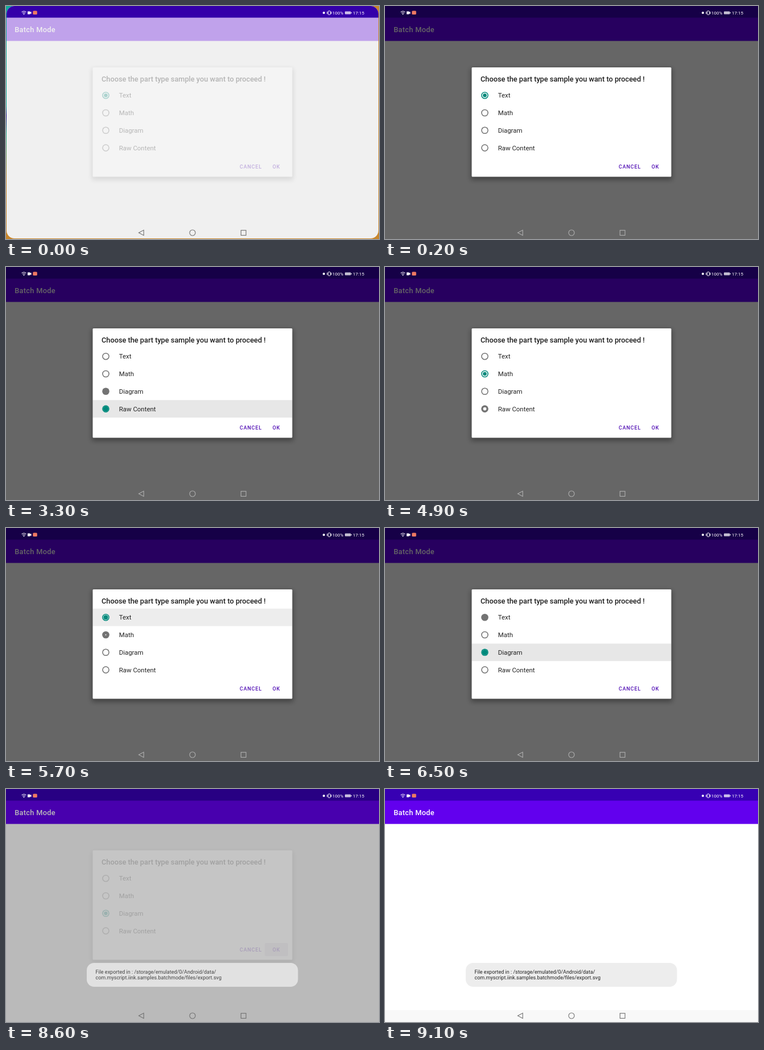
Write an HTML page that moves like this. It is 656 px wide and 410 px high and loops after 10000 ms.

```html
<!DOCTYPE html>
<html lang="en">
<head>
<meta charset="utf-8">
<title>Batch Mode</title>
<style>
  html, body { margin: 0; width: 100%; height: 100%; overflow: hidden; }
  body { background: linear-gradient(#1a9 0 43%, #218 47%, #2a8 55%, #c8862c 75%) 0 0 / 50% 100% no-repeat, #c8862c; }
  svg { display: block; width: 656px; height: 410px; font-family: Roboto, sans-serif; }
  .medium { font-weight: 500; }
  .button { font-size: 9px; letter-spacing: .85px; fill: #4f0cb4; }
</style>
</head>
<body>
<svg id="screen" viewBox="0 0 656 410">
  <defs>
    <filter id="blur" x="-10%" y="-10%" width="120%" height="125%"><feGaussianBlur stdDeviation="4"/></filter>
  </defs>

  <rect width="656" height="410" fill="#fff"/>
  <rect id="nav" y="389" width="656" height="21" fill="#f8f8f8"/>
  <rect id="header" y="20" width="656" height="41.5" fill="#6200ee"/>
  <rect width="656" height="20.5" fill="#3700b3"/>
  <text class="medium" x="15.2" y="45.6" font-size="12.8" letter-spacing=".3" fill="#fff">Batch Mode</text>
  <rect id="dim" width="656" height="410"/>

  <g fill="#fff" font-size="8">
    <g fill="none" stroke="#fff" stroke-width="1">
      <path d="M27.5 10.5q4-3 8 0M29 12.5q2.5-2 5 0"/>
      <rect x="566.5" y="8.8" width="4" height="6.4" rx=".8"/>
      <path d="M564.8 10v4M572.2 10v4"/>
    </g>
    <circle cx="31.5" cy="14.3" r="1"/>
    <path d="M38 9.5h4.5v1.5l2-1v4l-2-1v1.5h-4.5z"/>
    <rect x="47.3" y="8.5" width="7.5" height="6.5" rx="1.5" fill="#ee7a62"/>
    <circle cx="559" cy="12" r="2"/>
    <text x="574" y="15">100%</text>
    <rect x="596" y="9.5" width="10.5" height="5" rx="1" fill-opacity=".75"/>
    <rect x="606.8" y="11" width="1" height="2"/>
    <text x="610" y="15">17:15</text>
  </g>

  <g id="keys" fill="none" stroke-width="1.1">
    <path d="M233.5 399l8.7-4.7v9.4z"/>
    <circle cx="328" cy="399" r="5"/>
    <rect x="413.3" y="394.7" width="8.8" height="8.8"/>
  </g>

  <g id="dialog">
    <rect x="151" y="110" width="354" height="196" fill-opacity=".35" filter="url(#blur)"/>
    <rect x="152.5" y="108" width="351" height="192.5" rx="1.5" fill="#fff"/>
    <text class="medium" x="168" y="132.6" font-size="12.75" fill="#1d1d1d">Choose the part type sample you want to proceed !</text>
    <g id="rows"></g>
    <rect id="press" x="455" y="271" width="41" height="23" rx="2" fill="#30135c"/>
    <text class="medium button" x="411" y="286">CANCEL</text>
    <text class="medium button" x="468.7" y="286">OK</text>
  </g>

  <g id="toast">
    <rect x="142" y="306" width="371.5" height="42" rx="13" fill="#ededed"/>
    <g font-size="9" fill="#222">
      <text x="157.5" y="325">File exported in : /storage/emulated/0/Android/data/</text>
      <text x="157.5" y="335.4">com.myscript.iink.samples.batchmode/files/export.svg</text>
    </g>
  </g>
</svg>
<script>
const LOOP = 10000, STEP = 100;
const GREY = '#737373', TEAL = '#00897b';
const HOLE = 4.8, DOT = 3.3;
// [start time, row that gets chosen]
const taps = [[1500, 1], [2200, 2], [3000, 3], [4450, 1], [5350, 0], [6200, 2]];

const $ = id => document.getElementById(id);
const set = (el, attrs) => { for (const k in attrs) el.setAttribute(k, attrs[k]); };
const ramp = (t, t0, t1, a = 0, b = 1) => a + (b - a) * Math.min(1, Math.max(0, (t - t0) / (t1 - t0)));

const rows = ['Text', 'Math', 'Diagram', 'Raw Content'].map((label, i) => {
  const y = 157.2 + 30.8 * i;
  const g = document.createElementNS('http://www.w3.org/2000/svg', 'g');
  g.innerHTML = `<rect x="152.5" y="${y - 15.4}" width="351" height="30.8"/>
    <circle cx="175.5" cy="${y}" r="6.3"/>
    <circle cx="175.5" cy="${y}" fill="#fff"/>
    <circle cx="175.5" cy="${y}"/>
    <text x="198.7" y="${y + 4.2}" font-size="11.45" fill="#222">${label}</text>`;
  $('rows').append(g);
  const [glow, ring, hole, dot] = g.children;
  return { glow, ring, hole, dot };
});

function radio(row, color, hole, dot, glow) {
  set(row.ring, { fill: color });
  set(row.hole, { r: hole });
  set(row.dot, { r: dot, fill: color });
  set(row.glow, { 'fill-opacity': glow });
}

function drawRows(t) {
  let chosen = 0, previous = -1, age = 0;
  for (const [start, row] of taps) {
    if (t < start) break;
    [previous, chosen, age] = [chosen, row, t - start];
  }
  rows.forEach((row, i) => {
    if (i === chosen && previous >= 0) {
      const filled = age >= 300;
      const glow = Math.min(ramp(age, 0, 150), ramp(age, 320, 430, 1, 0)) * .095;
      radio(row, age < 150 ? GREY : TEAL,
        filled ? HOLE : ramp(age, 150, 290, HOLE, 0),
        filled ? ramp(age, 310, 390, HOLE, DOT) : 0, glow);
    } else if (i === previous) {
      const filled = age >= 300;
      radio(row, age < 150 ? TEAL : GREY,
        filled ? ramp(age, 300, 550, 0, HOLE) : HOLE,
        filled ? 0 : ramp(age, 150, 290, DOT, HOLE), 0);
    } else {
      radio(row, i === chosen ? TEAL : GREY, HOLE, i === chosen ? DOT : 0, 0);
    }
  });
}

function draw(t) {
  const opening = t < 200, closing = t >= 8600, done = t >= 8700;
  const dim = opening ? ramp(t, 0, 200, .06, .6) : done ? 0 : closing ? .27 : .6;
  set($('dim'), { 'fill-opacity': dim });
  set($('header'), { opacity: ramp(t, 0, 200, .325, 1) });
  set($('nav'), { opacity: done ? 1 : 0 });
  set($('keys'), { stroke: dim > .3 ? '#b0b0b0' : '#707070' });
  set($('dialog'), { opacity: done ? 0 : closing ? .16 : ramp(t, 0, 200, .28, 1) });
  set($('press'), { 'fill-opacity': ramp(t, 7500, 7700, 0, .14) });
  set($('toast'), { opacity: done ? 1 : closing ? .78 : 0 });
  $('screen').style.clipPath = t < STEP ? 'inset(0 1px 1px 1px round 14px)' : 'none';
  drawRows(t);
}

const begin = performance.now();
function tick() {
  const t = (performance.now() - begin) % LOOP;
  draw(Math.floor(t / STEP) * STEP);
  requestAnimationFrame(tick);
}
tick();
</script>
</body>
</html>
```
